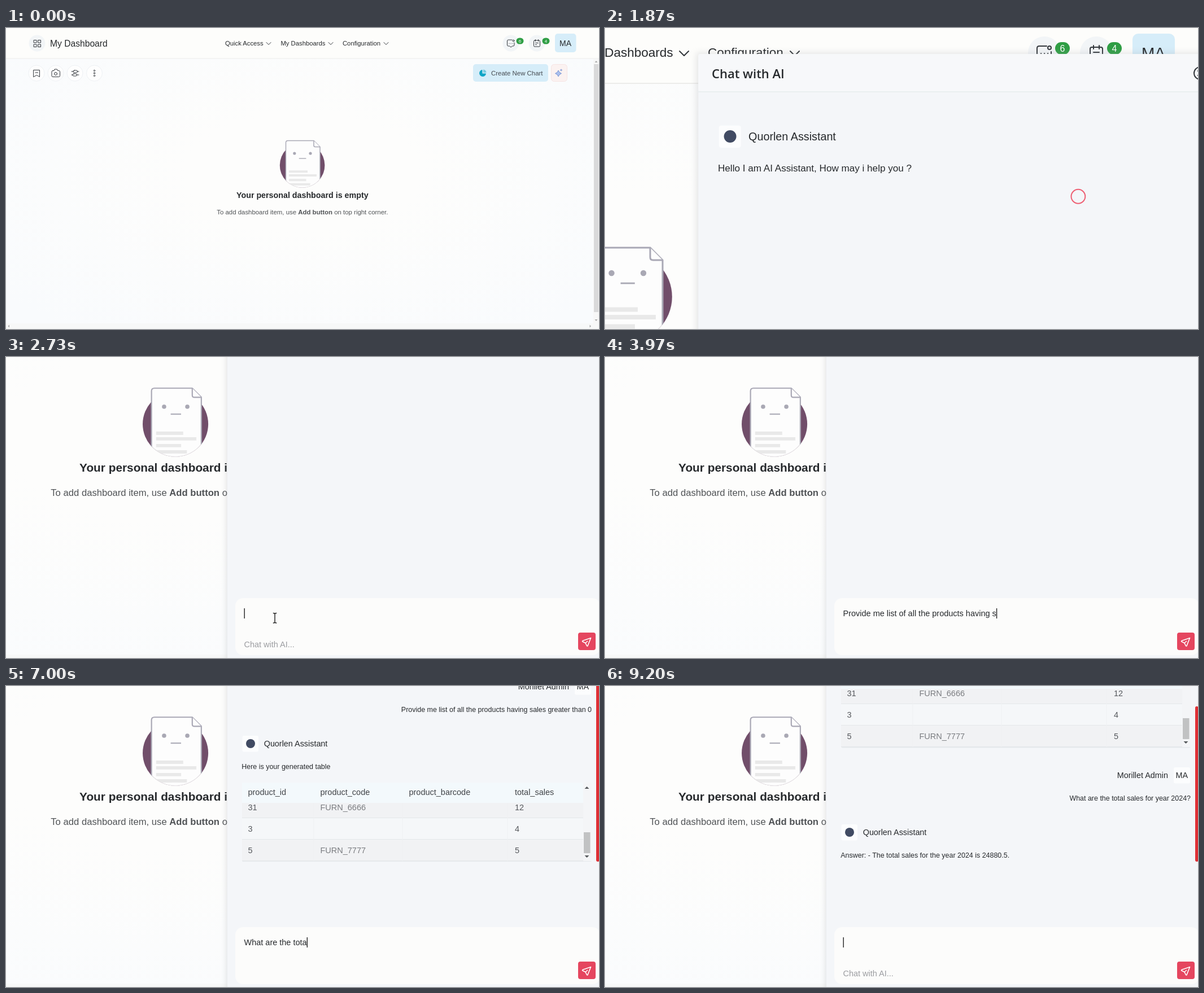
These frames come from a looping animation (1050 by 533 pixels, 9230 ms). An HTML page:

```html
<!DOCTYPE html>
<html lang="en">
<head>
<meta charset="utf-8">
<title>Dashboard chat</title>
<style>
html, body { margin: 0; width: 100%; height: 100%; overflow: hidden; background: #fdfdfc; }
body > svg { display: block; width: 100vw; height: 100vh; }
text { font-family: "Liberation Sans", Arial, sans-serif; dominant-baseline: central; white-space: pre; fill: #26292c; }
.nav text { font-size: 11.25px; }
.mid { text-anchor: middle; }
.end { text-anchor: end; }
.line { fill: none; stroke: #33373c; stroke-width: 1; stroke-linecap: round; stroke-linejoin: round; }
.disc { fill: #f2f5f7; }
.tool { fill: #fefefe; stroke: #eef1f4; }
.badge { fill: #2f9e44; }
.nav .count { font-size: 8px; fill: #fff; text-anchor: middle; }
.page { fill: #fdfdfd; stroke: #a9a8b5; stroke-width: 1.5; }
.name { font-size: 14.4px; }
.msg { font-size: 12.47px; }
.input { font-size: 14.5px; }
.cell { font-size: 14.5px; fill: #55585c; }
.head { fill: #404347; }
.code { fill: #7b7d81; }
</style>
</head>
<body>
<svg viewBox="0 0 1050 533">
  <defs>
    <radialGradient id="glow" cx=".5" cy=".48" r=".65">
      <stop offset=".3" stop-color="#fdfdfc"/><stop offset="1" stop-color="#f9fbfd"/>
    </radialGradient>
    <clipPath id="pageClip"><path d="M480 190H570V243H564.4A39.8 39.8 0 0 1 484.8 243H480Z"/></clipPath>
    <filter id="soft" x="-5%" y="-5%" width="110%" height="110%"><feGaussianBlur stdDeviation="3"/></filter>
  </defs>

  <g id="world">
    <rect width="1050" height="533" fill="url(#glow)"/>

    <g class="nav">
      <rect width="1050" height="54" fill="#fdfdfb"/>
      <path d="M0 54H1050" stroke="#ececea"/>
      <circle class="disc" cx="55" cy="27" r="14.5"/>
      <path class="line" d="M49.5 21.5h4.5v4.5h-4.5zM57 21.5h4.5v4.5h-4.5zM49.5 29h4.5v4.5h-4.5zM57 29h4.5v4.5h-4.5z"/>
      <text x="78" y="27" style="font-size:15.65px">My Dashboard</text>
      <text x="388" y="26.7">Quick Access</text>
      <text x="486.5" y="26.7">My Dashboards</text>
      <text x="596" y="26.7">Configuration</text>
      <path class="line" d="M461 25.5l4 4 4-4M571 25.5l4 4 4-4M669 25.5l4 4 4-4"/>
      <circle class="disc" cx="894" cy="27" r="14.5"/>
      <path class="line" d="M896 21h-6.5q-2 0-2 2v7q0 2 2 2h2l2.500 2 2.500-2h1.500q2 0 2-2v-4M891 27.500h.1M894 27.500h.1M897 27.500h.1"/>
      <circle class="line" cx="898.5" cy="22.5" r="1.5"/>
      <circle class="disc" cx="940" cy="27" r="14.5"/>
      <path class="line" d="M936 22h8q1.500 0 1.500 1.500v8q0 1.500-1.500 1.500h-8q-1.500 0-1.500-1.500v-8q0-1.500 1.500-1.500zM937.5 20.500v3M942.500 20.500v3M937.500 26.500h5M937.500 29.500h2"/>
      <rect class="badge" x="903.5" y="17.5" width="13" height="11" rx="5.5"/><text class="count" x="910" y="23">6</text>
      <rect class="badge" x="949.5" y="17.5" width="13" height="11" rx="5.5"/><text class="count" x="956" y="23">4</text>
      <rect x="972" y="10" width="37.5" height="33" rx="5" fill="#d6edf9"/>
      <text class="mid" x="990.5" y="27" style="font-size:14px">MA</text>
    </g>

    <circle class="tool" cx="54" cy="80" r="14"/>
    <circle class="tool" cx="88" cy="80" r="14"/>
    <circle class="tool" cx="122" cy="80" r="14"/>
    <circle class="tool" cx="156.5" cy="80" r="14"/>
    <path class="line" d="M49 74.5h10.5v12l-5.2-3-5.3 3zM52 79h4.5"/>
    <path class="line" d="M83 75.5h2l1-2.5h4.5l1 2.5h2q2 0 2 2v7q0 2-2 2h-10.5q-2 0-2-2v-7q0-2 2-2z"/>
    <circle class="line" cx="88" cy="81" r="2.5"/>
    <path class="line" d="M116 77h3M126 77h3M116 83h2M125 83h4M121 75h3.5a2 2 0 0 1 0 4h-3.5a2 2 0 0 1 0-4zM120 81h3.5a2 2 0 0 1 0 4h-3.5a2 2 0 0 1 0-4z"/>
    <g class="line"><circle cx="156.5" cy="75.5" r="1.2"/><circle cx="156.5" cy="80" r="1.2"/><circle cx="156.5" cy="84.5" r="1.2"/></g>

    <rect x="827" y="64" width="133" height="31" rx="5" fill="#d6edf9"/>
    <path d="M843.5 74v6.5h6.5a6 6 0 1 1-6.5-6.5z" fill="#10a5c6"/>
    <path d="M845 73.5a5.5 5.5 0 0 1 5.5 5.5h-5.5z" fill="#7ccbe0"/>
    <text x="859" y="79.7" style="font-size:11.45px;fill:#454a50">Create New Chart</text>
    <rect x="965.5" y="64.5" width="28" height="30" rx="5" fill="#fbf2f1" stroke="#f6e4e3"/>
    <path d="M978 75q1 4 5.5 5.5-4.500 1.500-5.500 5.500-1-4-5.500-5.500 4.500-1.500 5.500-5.500z" fill="#a9c0ee" stroke="#7894d4"/>
    <path d="M983 72.5v4M981 74.5h4" stroke="#7894d4"/>

    <circle cx="524.6" cy="243" r="39.8" fill="#714e6a"/>
    <g clip-path="url(#pageClip)">
      <path class="page" d="M495.5 290V203q0-3.5 3.5-3.5H545l11 11V290z"/>
      <path class="page" d="M545 199.5v8.5q0 2.5 2.5 2.5h8.5"/>
      <path d="M501 254.2H534M501 261H550M501 269.2H531.5M501 276.8H538.5" stroke="#e9e9e9" stroke-width="4"/>
      <path d="M496 270.5A39.5 39.5 0 0 0 555.5 268" fill="none" stroke="#e6e4e6"/>
    </g>
    <g fill="#a9a8b4"><circle cx="510.8" cy="222" r="2.6"/><circle cx="539" cy="222" r="2.6"/><rect x="518.8" y="230.3" width="12.6" height="1.4"/></g>
    <text class="mid" x="524.8" y="295.8" style="font-size:14.27px;font-weight:bold">Your personal dashboard is empty</text>
    <text class="mid" x="524.8" y="326.3" style="font-size:11.42px;fill:#505356">To add dashboard item, use <tspan font-weight="bold">Add button</tspan> on top right corner.</text>

    <rect x="1040" y="55" width="10" height="478" fill="#f7f7f7"/>
    <rect x="1041" y="64" width="8" height="439" fill="#d9d9da"/>
    <rect y="523" width="1050" height="10" fill="#f7f8f8"/>
    <path d="M1042.5 61l2.5-3 2.5 3zM1042.5 516l2.5 3 2.5-3zM6 525.5l-2.5 2.5 2.5 2.5zM1033.5 525.5l2.5 2.5-2.5 2.5z" fill="#a9a9a9"/>

    <g id="panel">
      <rect x="586" y="27" width="455" height="515" fill="#9a9da2" opacity=".25" filter="url(#soft)"/>
      <rect x="587.6" y="28" width="452.4" height="510" rx="2" fill="#f4f6f9"/>
      <rect x="587.6" y="28" width="452.4" height="33" rx="2" fill="#f7f8fa"/>
      <path d="M587.6 61.5H1040" stroke="#e7ecee" stroke-width=".7"/>
      <text x="599.5" y="45" style="font:600 11px 'Open Sans','Noto Sans',sans-serif">Chat with AI</text>
      <circle class="line" cx="1032" cy="45" r="5.5"/>
      <path class="line" d="M1030 43l4 4M1034 43l-4 4"/>
      <g transform="translate(318.8 161.6) scale(.68587)">
        <svg x="392" y="-145" width="660" height="456"><g transform="translate(-392 145)"><g id="log"></g></g>
          <rect id="bar" x="653" width="5.5" rx="2.7" fill="#df2f35"/></svg>
        <rect x="406" y="427" width="646" height="101" rx="14" fill="#fcfcfb"/>
        <text id="typed" class="input" x="421.5" y="454"></text>
        <rect id="caret" y="445" width="1.4" height="18" fill="#222"/>
        <text id="hint" class="input" x="421.5" y="509" style="fill:#9c9da1">Chat with AI...</text>
        <rect x="1013" y="488" width="31" height="31" rx="4" fill="#e5465f"/>
        <path d="M1035.5 497.5L1021 502.5q-1 .8 0 1.5l5 2.5 2.500 5q.8 1 1.500 0zM1026 506.500l4-3.500" fill="none" stroke="#fff" stroke-width="1.6" stroke-linejoin="round"/>
      </g>
    </g>

    <g id="cursor">
      <path id="arrow" d="M0 0V11.5l2.7-2.5 1.9 4 2-.9-1.9-3.9H8.2z" fill="#111" stroke="#fff" stroke-width=".7"/>
      <circle id="ring" r="6.2" fill="none" stroke="#ee5f73"/>
      <path id="beam" d="M-2.2-6Q0-6 0-5Q0-6 2.2-6M0-5V5M-2.2 6Q0 6 0 5Q0 6 2.2 6" fill="none" stroke="#222"/>
    </g>
  </g>
</svg>

<script>
const LOOP = 9230;
const $ = id => document.getElementById(id);
const clamp = x => Math.max(0, Math.min(1, x));
const ease = x => x * x * (3 - 2 * x);
const show = (id, on) => $(id).style.display = on ? '' : 'none';

// Eased value of [time, ...values] keys at time t
function track(keys, t) {
  const i = keys.findIndex(k => k[0] > t);
  if (i < 0) return keys.at(-1).slice(1);
  if (i === 0) return keys[0].slice(1);
  const a = keys[i - 1], b = keys[i], p = ease((t - a[0]) / (b[0] - a[0]));
  return a.slice(1).map((v, j) => v + (b[j + 1] - v) * p);
}

const CAMERA = [[300, 1, 0, 0], [1100, 2, -1010, -10], [1885, 2, -1010, -10], [2550, 1.458, -464.8, -235.6]];
const POINTER = [[400, 760, 250], [1150, 979, 90], [1670, 979, 90], [2450, 645.3, 478.6], [4560, 645.3, 478.6],
  [4950, 867.5, 329.6], [5700, 867.5, 329.6], [6250, 645.3, 478.6]];
const QUERIES = [
  { text: 'Provide me list of all the products having sales greater than 0', start: 2780, send: 4560, reply: 4800 },
  { text: 'What are the total sales for year 2024?', start: 6530, send: 7700, reply: 8100 }
];
const PER_CHAR = 27;

const ROWS = [[20, 'FURN_0789', 3], [9, 'FURN_1118', 2], [25, 'FURN_8220', 4], [35, 'FURN_8999', 1], [6, 'FURN_8888', 5],
  [12, 'FURN_0096', 1], [33, 'FURN_0269', 7], [31, 'FURN_6666', 12], [3, '', 4], [5, 'FURN_7777', 5]];
const ROW_H = 38, MAX_SCROLL = 277;
const COLS = [10.5, 138.5, 295.5, 483];

const text = (x, y, cls, s) => `<text x="${x}" y="${y}" class="${cls}">${s}</text>`;

const fromBot = (y, s) => `<rect x="418.5" y="${y - 14}" width="28.5" height="28.5" rx="3" fill="#fcfdfe"/>
  <circle cx="433" cy="${y}" r="8" fill="#414b63"/>` +
  text(456.7, y, 'name', 'Quorlen Assistant') + text(417.3, y + 41.3, 'msg', s);

const fromUser = (y, s) => `<rect x="1007" y="${y - 14}" width="29" height="28.5" rx="3" fill="#fcfdfe"/>` +
  text(1021.3, y, 'name mid', 'MA') + text(997, y, 'name end', 'Morillet Admin') + text(1037, y + 41.3, 'msg end', s);

function table() {
  const rows = ROWS.map(([id, code, sales], i) => {
    const y = i * ROW_H, mid = y + ROW_H / 2;
    return `<rect y="${y}" width="604" height="${ROW_H}" fill="${i % 2 ? '#f1f2f4' : '#f5f7f9'}"/>
      <path d="M0 ${y + ROW_H - .5}H604" stroke="#e4e7ea"/>` +
      text(COLS[0], mid, 'cell', id) + text(COLS[1], mid, 'cell code', code) + text(COLS[3], mid, 'cell', sales);
  }).join('');
  const heads = ['product_id', 'product_code', 'product_barcode', 'total_sales']
    .map((s, i) => text(COLS[i], 17.5, 'cell head', s)).join('');
  return `<rect x="418" y="184" width="619" height="139.5" rx="3" fill="#e6e9ec"/>
    <svg x="418" y="183" width="619" height="139">
      <rect width="619" height="139" fill="#f4f5f7"/>
      <g id="rows">${rows}<path d="M127 0V380M284 0V380M470 0V380" stroke="#eff1f3"/></g>
      <rect width="604" height="36" fill="#f3f9fc"/>${heads}
      <path d="M606.5 11l4-4 4 4zM606.5 129l4 4 4-4z" fill="#55585b"/>
      <rect id="thumb" x="605" width="11.5" height="37" fill="#c1c2c3"/>
    </svg>`;
}

$('log').innerHTML = fromBot(-88.3, 'Hello I am AI Assistant, How may i help you ?') +
  `<g id="ask0">${fromUser(13, QUERIES[0].text)}</g>
   <g id="reply0">${fromBot(114, 'Here is your generated table')}${table()}</g>
   <g id="ask1">${fromUser(372, QUERIES[1].text)}</g>
   <g id="reply1">${fromBot(473, 'Answer: - The total sales for the year 2024 is 24880.5.')}</g>`;

function draw(t) {
  const [zoom, cx, cy] = track(CAMERA, t);
  $('world').setAttribute('transform', `translate(${cx} ${cy}) scale(${zoom})`);
  $('panel').setAttribute('opacity', clamp((t - 1350) / 200));

  let typed = '';
  QUERIES.forEach((q, i) => {
    if (t >= q.start && t < q.send) typed = q.text.slice(0, Math.floor((t - q.start) / PER_CHAR));
    show('ask' + i, t >= q.send);
    show('reply' + i, t >= q.reply);
  });
  $('typed').textContent = typed;
  $('caret').setAttribute('x', 421.5 + (typed ? $('typed').getComputedTextLength() : 0));
  show('caret', t > 2600 && t < 4560 || t > 6350);
  show('hint', !typed);

  const scroll = t < 4800 ? 0 : t < 7700 ? 12 : t < 8100 ? 113 : 214;
  $('log').setAttribute('transform', `translate(0 ${-scroll})`);
  const barH = scroll > 200 ? 275 : scroll > 100 ? 350 : 445;
  $('bar').setAttribute('y', 456 - barH);
  $('bar').setAttribute('height', barH);
  show('bar', scroll > 0);

  const p = clamp((t - 5050) / 491);
  $('rows').setAttribute('transform', `translate(0 ${36 - p * MAX_SCROLL})`);
  $('thumb').setAttribute('y', 15 + p * 73);

  const [x, y] = track(POINTER, t);
  $('cursor').setAttribute('transform', `translate(${x} ${y})`);
  const ring = t > 1500 && t < 2050, beam = t >= 2250 && t < 4560 || t > 6100;
  show('cursor', t > 400 && t < 2780 || t > 4560 && t < 6530);
  show('ring', ring);
  show('beam', beam);
  show('arrow', !ring && !beam);
}

const begin = performance.now();
function tick() {
  draw((performance.now() - begin) % LOOP);
  requestAnimationFrame(tick);
}
tick();
</script>
</body>
</html>
```
